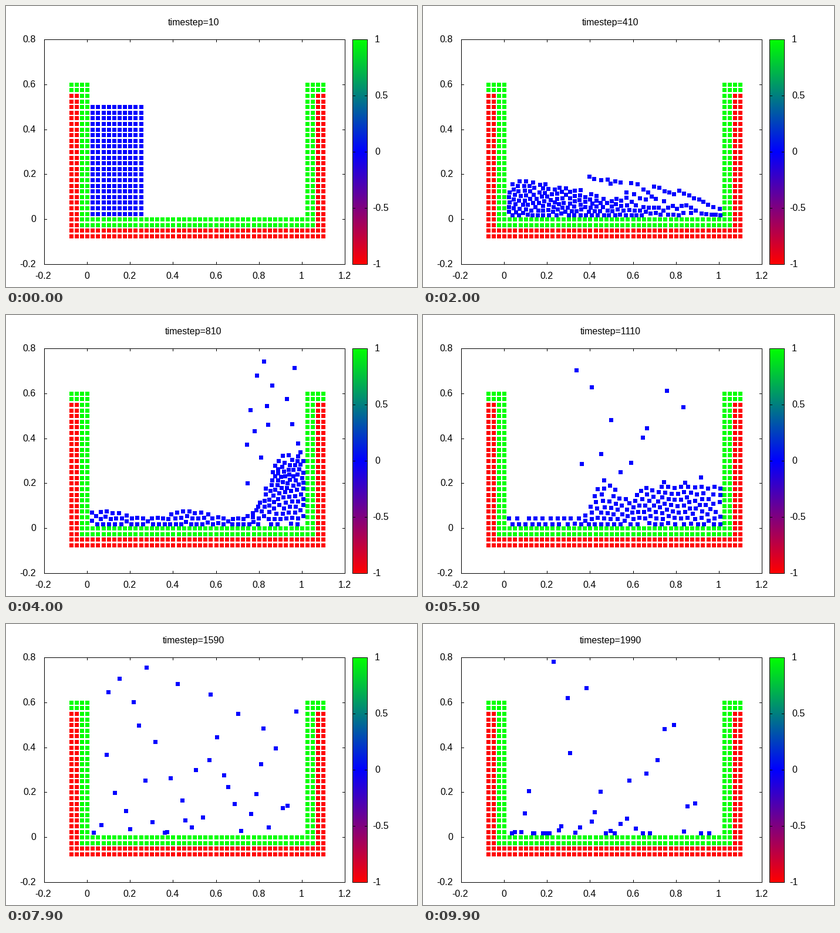
Write a matplotlib script that moves like this. It is 700 by 480 pixels and loops after 10 s.

```python
import numpy as np
import matplotlib.pyplot as plt
from matplotlib.animation import FuncAnimation
from matplotlib.collections import PolyCollection

plt.rcParams["font.family"] = "Liberation Sans"
rng = np.random.default_rng(4)

FRAMES, COUNT, SURVIVORS = 100, 200, 40
LEFT, RIGHT, TOP, BOTTOM = 65, 577, 57, 441
WALL_L, WALL_R, FLOOR = 146, 506, 357
HALF_G = 1882            # px / s^2
STEP = 0.02              # simulated seconds per frame


def to_px(x, y):
    return np.stack([LEFT + (x + 0.2) / 1.4 * 512, BOTTOM - (y + 0.2) * 384], -1)


# ---------- particle clouds ----------

def push(p, d):
    """Displacement that separates points closer than d."""
    diff = p[:, None] - p
    r = np.hypot(diff[..., 0], diff[..., 1]) + 1e-6
    return 0.25 * (diff * (np.clip(d - r, 0, None) / r)[..., None]).sum(1)


def pack(height, reach, n):
    """Fill the space below height(x), for x up to reach, evenly."""
    x = np.linspace(0.022, reach, 400)
    xs, top = to_px(x, height(x)).T
    depth = FLOOR + 8 - top
    cdf = np.cumsum(depth) / depth.sum()
    px = np.interp((np.arange(n) + rng.random(n)) / n, cdf, xs)
    p = np.stack([px, FLOOR - rng.random(n) * (FLOOR - np.interp(px, xs, top))], 1)
    d = 1.1 * np.sqrt(depth.mean() * (xs[-1] - xs[0] + 8) / n)
    for _ in range(30):
        p += push(p, d)
        p[:, 0] = p[:, 0].clip(xs[0], xs[-1])
        p[:, 1] = p[:, 1].clip(np.interp(p[:, 0], xs, top), FLOOR)
    return p


def spray(n, xlim, ylim, skew, fall):
    """Loose drops: skew > 1 crowds the right side, fall > 1 the bottom."""
    u, v = ((rng.permutation(n) + rng.random(n)) / n for _ in range(2))
    return to_px(xlim[1] - (xlim[1] - xlim[0]) * u ** skew,
                 ylim[0] + (ylim[1] - ylim[0]) * v ** fall)


def cloud(height, reach=1.006, drops=np.empty((0, 2)), above=0):
    hidden = spray(above, (0.7, 1), (0.83, 0.95), 1, 1)
    return np.vstack([pack(height, reach, COUNT - len(drops) - above), drops, hidden])


def order(p, size):
    idx = np.argsort(p[:, 0], kind="stable")
    groups = np.split(idx, len(p) // size)
    return np.concatenate([g[np.argsort(p[g, 1], kind="stable")] for g in groups])


def match(prev, pts, size=20):
    """Hand each particle a goal in the same column and rank."""
    out = np.empty_like(prev)
    out[order(prev, size)] = pts[order(pts, size)]
    return out


def smooth(x, a, b):
    s = np.clip((x - a) / (b - a), 0, 1)
    return s * s * (3 - 2 * s)


def bell(x, mid, width):
    return np.exp(-((x - mid) / width) ** 2)


gx, gy = np.meshgrid(0.025 * np.arange(1, 11), 0.025 * np.arange(1, 21), indexing="ij")
block = to_px(gx.ravel(), gy.ravel())

collapse = cloud(lambda x: 0.36 / (1 + (x / 0.37) ** 4), reach=0.66)
spread = cloud(lambda x: 0.2 - 0.17 * x)
jet = cloud(lambda x: 0.075 + 0.055 * np.cos(np.pi * x / 1.4) ** 2 + 0.22 * x ** 20,
            drops=spray(23, (0.88, 1.005), (0.25, 0.78), 1.8, 1.4), above=12)
pile = cloud(lambda x: 0.06 + 0.017 * np.cos(16 * (x - 0.08)) + 0.26 * smooth(x, 0.76, 0.93),
             drops=spray(25, (0.73, 1.005), (0.2, 0.77), 1.3, 2), above=18)
wave = cloud(lambda x: 0.045 + 0.14 * smooth(x, 0.36, 0.46) + 0.03 * bell(x, 0.46, 0.03)
             - 0.06 * bell(x, 0.58, 0.05),
             drops=spray(14, (0.29, 0.93), (0.2, 0.76), 1, 1.8), above=26)
slosh = cloud(lambda x: 0.2 - 0.09 * x)

late = spray(SURVIVORS, (0.03, 0.99), (0.02, 0.77), 0.9, 1.8)
final = spray(SURVIVORS, (0.02, 1), (0.018, 0.95), 0.8, 5)

# ---------- motion ----------

times = np.array([0, 11, 19, 28, 40, 55, 66], float)
keys = [block]
for goal in (collapse, spread, jet, pile, wave, slosh):
    keys.append(match(keys[-1], goal))
speeds = np.zeros((len(keys), COUNT, 2))
for k in range(1, len(keys) - 1):
    speeds[k] = (keys[k + 1] - keys[k - 1]) / (times[k + 1] - times[k - 1])


def flow(i):
    """Smooth path through the clouds, kept apart and inside the tank."""
    i = min(i, times[-1])
    k = min(np.searchsorted(times, i, "right") - 1, len(times) - 2)
    h = times[k + 1] - times[k]
    s = (i - times[k]) / h
    p = (keys[k] * (1 + 2 * s) * (1 - s) ** 2 + keys[k + 1] * s * s * (3 - 2 * s)
         + h * speeds[k] * s * (1 - s) ** 2 + h * speeds[k + 1] * s * s * (s - 1))
    for _ in range(5):
        p = p + push(p, 8.8)
        p[:, 0] = p[:, 0].clip(WALL_L, WALL_R)
        p[:, 1] = np.minimum(p[:, 1], FLOOR)
    return p


def arc(a, b, start, end, i):
    """Free flight between two points."""
    s = (i - start) / (end - start)
    p = a + (b - a) * s
    p[:, 1] -= HALF_G * ((end - start) * STEP) ** 2 * s * (1 - s)
    return p


# Most particles are flung out of the tank, the rest keep bouncing
stay = rng.choice(COUNT, SURVIVORS, replace=False)
lost = np.setdiff1d(np.arange(COUNT), stay)
first = flow(55)[stay]
mid = match(first, late, 8)
last = match(mid, final, 8)

depart = rng.uniform(57, 69, len(lost))
angle = rng.normal(-np.pi / 2, 0.8, len(lost))
speed = rng.uniform(45, 80, len(lost))
kick = np.stack([np.cos(angle), np.sin(angle)], 1) * speed[:, None]


def particles(i):
    p = flow(i)
    if i > 55:
        p[lost] += kick * np.clip(i - depart, 0, None)[:, None]
        p[stay] = arc(first, mid, 55, 79, i) if i < 79 else arc(mid, last, 79, 99, i)
    return p


def squares(p):
    """7 px squares for the points inside the plot box."""
    p = p[(p[:, 0] >= LEFT) & (p[:, 0] <= RIGHT) & (p[:, 1] >= TOP) & (p[:, 1] <= BOTTOM)]
    corners = np.array([(-3, -3), (4, -3), (4, 4), (-3, 4)])
    return np.round(p)[:, None] + corners


# ---------- stage ----------

fig = plt.figure(figsize=(7, 4.8), dpi=100, facecolor="white")
ax = fig.add_axes([0, 0, 1, 1])

v = np.linspace(1, -1, 384)[:, None]
ramp = np.stack([np.clip(-v, 0, 1), np.clip(v, 0, 1), 1 - abs(v)], -1)
ax.imshow(ramp, extent=(590, 616, 441, 57), aspect="auto", interpolation="nearest")
ax.set(xlim=(0, 700), ylim=(480, 0))
ax.axis("off")


def line(x0, y0, x1, y1):
    ax.plot([x0 + 0.5, x1 + 0.5], [y0 + 0.5, y1 + 0.5], color="black", lw=0.72,
            snap=False, solid_capstyle="projecting", zorder=4)


def box(x0, y0, x1, y1):
    for a in ((x0, y0, x1, y0), (x1, y0, x1, y1), (x0, y1, x1, y1), (x0, y0, x0, y1)):
        line(*a)


def label(x, y, s, ha):
    return ax.text(x, y, s, ha=ha, va="baseline", fontsize=11.52, color="black")


box(LEFT, TOP, RIGHT, BOTTOM)
box(590, TOP, 615, BOTTOM)
for n in range(-1, 7):
    val = n / 5
    x, y = np.round(to_px(val, val))
    line(x, BOTTOM, x, BOTTOM - 4)
    line(x, TOP, x, TOP + 4)
    label(x - (2.5 if n < 0 else 0.5), 466, f"{val:g}", "center")
    if n < 5:
        line(LEFT, y, LEFT + 4, y)
        line(RIGHT, y, RIGHT - 4, y)
        label(51, y + 5, f"{val:g}", "right")
for n in range(-2, 3):
    y = 249 - 96 * n
    line(590, y, 594, y)
    line(615, y, 611, y)
    label(624 if n < 0 else 628, y + 5, f"{n / 2:g}", "left")
title = label(319, 33, "", "center")

# Tank: two layers of green lining, two of red shell
c, r = np.meshgrid(np.arange(-3, 45), np.arange(-3, 25))
solid = (c <= 0) | (c >= 41) | (r <= 0)
green = (r >= 23) | ((c >= -1) & (c <= 42) & (r >= -1))


def add_squares(p, color, z):
    poly = PolyCollection(squares(p), facecolors=color, edgecolors="none",
                          antialiaseds=False, zorder=z)
    return ax.add_collection(poly, autolim=False)


for mask, color in ((solid & green, "#00ff00"), (solid & ~green, "#ff0000")):
    add_squares(to_px(c[mask] * 0.025, r[mask] * 0.025), color, 2)
water = add_squares(block, "#0000ff", 3)

path = [squares(particles(i)) for i in range(FRAMES)]


def draw(i):
    water.set_verts(path[i])
    title.set_text(f"timestep={10 + 20 * i}")
    return water, title


anim = FuncAnimation(fig, draw, frames=FRAMES, interval=100, repeat=True, repeat_delay=0)
plt.show()
```
